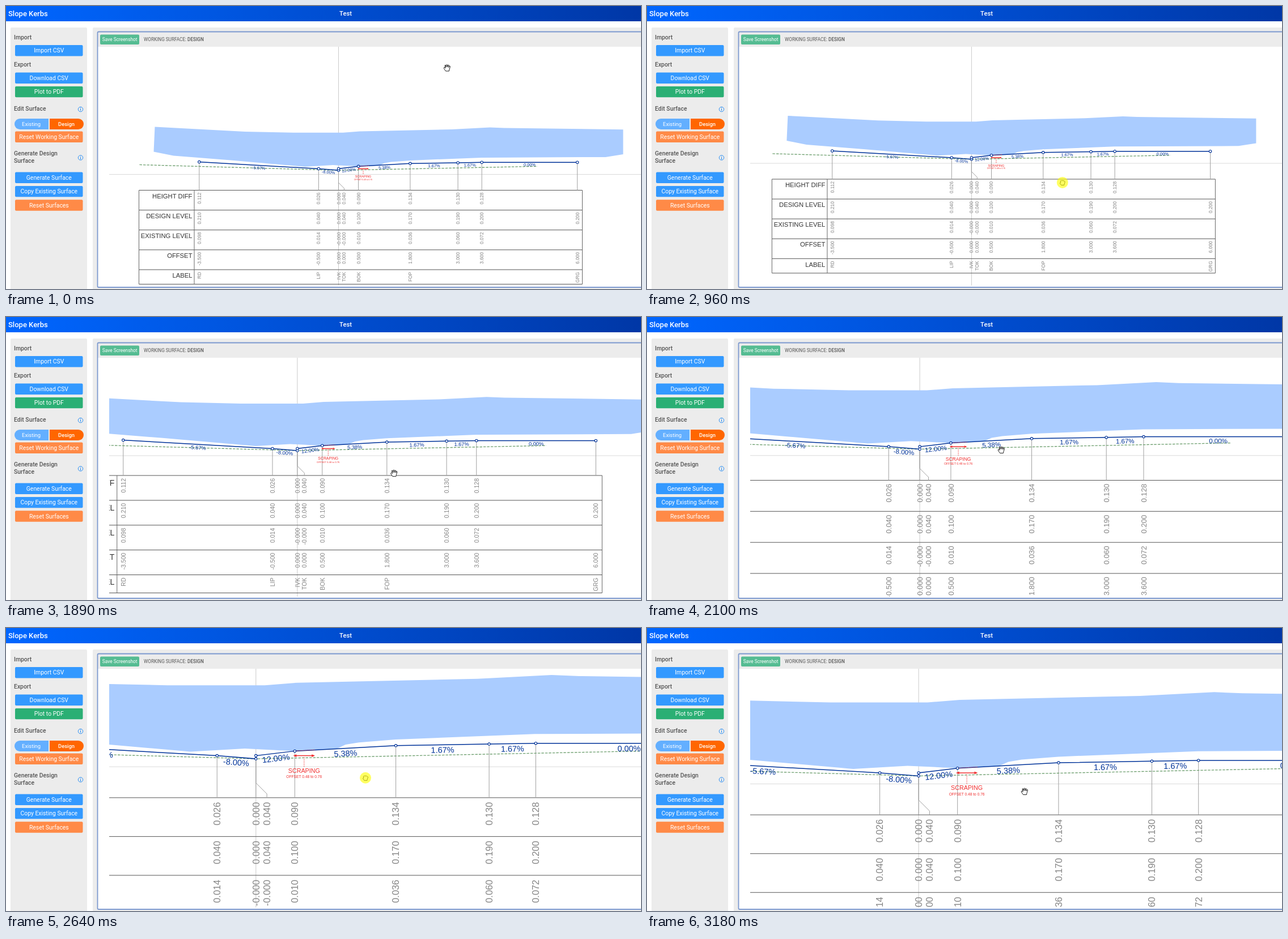
These frames come from a looping animation (1120x500 px, 3.32 s). An HTML page:

```html
<!DOCTYPE html>
<html lang="en">
<head>
<meta charset="utf-8">
<title>Driveway section viewer</title>
<style>
  html, body { margin: 0; width: 100%; height: 100%; overflow: hidden; background: #fff; }
  svg { display: block; }
  .ui { font-family: Roboto, "Open Sans", sans-serif; font-size: 10.4px; }
  .plot { font-family: "Liberation Sans", Arial, sans-serif; }
  .plot line, .plot path, .plot circle { vector-effect: non-scaling-stroke; }
</style>
</head>
<body>
<svg width="100%" height="100%" viewBox="0 0 1120 500">
  <defs>
    <linearGradient id="bar">
      <stop offset="0" stop-color="#0066ff"/>
      <stop offset="1" stop-color="#0037a6"/>
    </linearGradient>
    <clipPath id="view"><rect x="182" y="72" width="938" height="422"/></clipPath>
  </defs>
  <g id="ui" class="ui"></g>
  <g class="plot" clip-path="url(#view)">
    <line id="axisX" x1="182" x2="1120" stroke="#dadada"/>
    <line id="axisY" y1="72" y2="494" stroke="#cbcbcb"/>
    <g id="plot"></g>
  </g>
  <g id="cursor"></g>
</svg>
<script>
const NS = 'http://www.w3.org/2000/svg';
const $ = id => document.getElementById(id);

function add(parent, tag, attrs, text) {
  const el = document.createElementNS(NS, tag);
  for (const name in attrs) el.setAttribute(name, attrs[name]);
  if (text !== undefined) el.textContent = text;
  parent.appendChild(el);
  return el;
}
const rect = (p, x, y, width, height, fill, rx = 0) =>
  add(p, 'rect', { x, y, width, height, fill, rx });
const label = (p, x, y, text, fill, more = {}) => add(p, 'text', { x, y, fill, ...more }, text);
const toPath = pts => 'M' + pts.map(p => p.join(' ')).join('L');
const MIDDLE = { 'text-anchor': 'middle' };

// ---- Page around the drawing ----
const BLUE = '#3399ff', GREEN = '#2baf74', ORANGE = '#ff8a47', GREY = '#ececec';

function heading(y, ...lines) {
  lines.forEach((text, i) => label($('ui'), 14, y + i * 12.7, text, '#555', { 'font-weight': 500 }));
}

function buttons(y, ...items) {
  items.forEach(([text, fill], i) => {
    const top = y + i * 24.4;
    rect($('ui'), 16, top, 119.5, 19.4, fill, 2);
    label($('ui'), 75.8, top + 13.4, text, '#fff', MIDDLE);
  });
}

function info(y) {
  add($('ui'), 'circle', { cx: 131.5, cy: y, r: 4.2, fill: 'none', stroke: '#2b90f5' });
  label($('ui'), 131.5, y + 2.6, 'i', '#2b90f5', { 'font-size': 7.5, 'font-weight': 700, ...MIDDLE });
}

function buildUi() {
  const ui = $('ui');
  rect(ui, 0, 0, 1120, 27, 'url(#bar)');
  label(ui, 4, 17.5, 'Slope Kerbs', '#fff', { 'font-size': 13, 'font-weight': 500 });
  label(ui, 599, 17, 'Test', '#fff', { 'font-size': 11.2, 'font-weight': 500, ...MIDDLE });

  rect(ui, 8, 38, 135, 470, GREY, 2);
  rect(ui, 153, 38, 980, 470, GREY, 2);
  rect(ui, 162, 72, 980, 425, '#fff');
  add(ui, 'rect', { x: 161.5, y: 45.5, width: 980, height: 451.5, rx: 2,
    fill: 'none', stroke: '#7d99cf', 'stroke-width': 1.8 });
  rect(ui, 166, 50.5, 69, 17.5, '#55bc92', 2);
  label(ui, 200.7, 62, 'Save Screenshot', '#fff', { 'font-size': 8.35, ...MIDDLE });
  const caption = label(ui, 243, 62, 'WORKING SURFACE: ', '#555', { 'font-size': 8.2 });
  add(caption, 'tspan', { 'font-weight': 500 }, 'DESIGN');

  heading(58.5, 'Import');
  buttons(69, ['Import CSV', BLUE]);
  heading(107, 'Export');
  buttons(117.5, ['Download CSV', BLUE], ['Plot to PDF', GREEN]);
  heading(185, 'Edit Surface');
  info(182.5);
  add(ui, 'path', { d: 'M75 199H24.5a9.5 9.5 0 0 0 0 19H75z', fill: '#63afff' });
  add(ui, 'path', { d: 'M77 199H127.5a9.5 9.5 0 0 1 0 19H77z', fill: '#ff6600' });
  label(ui, 44.5, 212, 'Existing', '#fff', { 'font-size': 9.4, ...MIDDLE });
  label(ui, 106.5, 212, 'Design', '#fff', { 'font-size': 9.4, 'font-weight': 500, ...MIDDLE });
  buttons(221.5, ['Reset Working Surface', ORANGE]);
  heading(264, 'Generate Design', 'Surface');
  info(268);
  buttons(293.5, ['Generate Surface', BLUE], ['Copy Existing Surface', BLUE], ['Reset Surfaces', ORANGE]);
}

// ---- Section drawing, in units around the datum point ----
const UNIT = 70.2, TABLE = 28, ROW = 35.1, BOTTOM = 194, LEFT = -352, RIGHT = 430;
const NAVY = '#003399', RED = '#f03030';
const point = (offset, level) => [offset * UNIT, -7.2 - level * UNIT];

// The ground falls to the middle; the tiny shift prints its zero as -0.000
const ground = offset => (offset < 0 ? -.028 : .02) * offset - 1e-9;
const GROUND_END = 5;

const STATIONS = [
  { name: 'RD', offset: -3.5, level: .21 },
  { name: 'LIP', offset: -.5, level: .04 },
  { name: 'IVK', offset: 0, level: 0 },
  { name: 'TOK', offset: 0, level: .04, shift: 9.9 },
  { name: 'BOK', offset: .5, level: .1 },
  { name: 'FOP', offset: 1.8, level: .17 },
  { name: '', offset: 3, level: .19 },
  { name: '', offset: 3.6, level: .2 },
  { name: 'GRG', offset: 6, level: .2 }
];

// Outline of the area swept by the vehicle, clockwise from top left
const SWEPT = [[-324, -84], [-165, -75.6], [-80, -73.7], [8, -73.7], [37, -76], [200, -79.6],
  [267, -83], [292, -82], [502, -79.2], [502, -35.5], [471, -30.6], [252, -29.6], [126, -24.6],
  [93, -22], [81, -20], [73, -16.3], [35, -14.2], [-10, -16.4], [-59, -13.6], [-190, -25],
  [-291, -33], [-326, -40]];

function stroke(pts, color, width = 1, dash = 'none') {
  add($('plot'), 'path', { d: toPath(pts), fill: 'none', stroke: color,
    'stroke-width': width, 'stroke-dasharray': dash });
}

function buildTable() {
  const g = $('plot');
  const rows = ['HEIGHT DIFF', 'DESIGN LEVEL', 'EXISTING LEVEL', 'OFFSET', 'LABEL'];
  rows.forEach((text, i) => {
    const y = TABLE + i * ROW;
    stroke([[LEFT, y], [RIGHT, y]], '#555');
    label(g, -258, y + 14.2, text, '#333', { 'font-size': 11.25, 'text-anchor': 'end' });
  });
  stroke([[LEFT, BOTTOM], [RIGHT, BOTTOM]], '#555');
  [LEFT, -254.5, RIGHT].forEach(x => stroke([[x, TABLE], [x, BOTTOM]], '#666'));

  STATIONS.forEach(({ name, offset, level, shift = 0 }) => {
    const [x, y] = point(offset, level);
    stroke(shift ? [[x, y], [x, 14.6], [x + shift, 24.5], [x + shift, TABLE]] : [[x, y], [x, TABLE]],
      '#a0a0a0');
    const known = offset <= GROUND_END, base = ground(offset);
    const cells = [known && level - base, level, known && base, offset, name];
    cells.forEach((cell, i) => add(g, 'text', {
      transform: `translate(${x + shift + 3} ${TABLE + i * ROW + 4}) rotate(-90)`,
      'font-size': 8.4, 'text-anchor': 'end', fill: '#858585'
    }, typeof cell === 'number' ? cell.toFixed(3) : cell || ''));
  });
}

function buildScraping() {
  const g = $('plot'), y = -10;
  const [from] = point(.48, 0), [to] = point(.76, 0), mid = (from + to) / 2;
  stroke([point(.48, .1), point(.76, .115)], RED, 1, '1.5 1.5');
  stroke([[mid, y + 1.5], [mid, 0]], RED, 1, '1.5 1.5');
  stroke([[from + 1, y], [to - 1, y]], RED, 1.5);
  [[from, 3], [to, -3]].forEach(([x, d]) =>
    add(g, 'path', { d: toPath([[x, y], [x + d, y - 1.2], [x + d, y + 1.2]]) + 'Z', fill: RED }));
  label(g, mid, 5.6, 'SCRAPING', RED, { 'font-size': 5.5, ...MIDDLE });
  label(g, mid, 10.4, 'OFFSET 0.48 to 0.76', RED, { 'font-size': 3.4, ...MIDDLE });
}

function buildPlot() {
  const g = $('plot');
  add(g, 'path', { d: toPath(SWEPT) + 'Z', fill: '#aaccff' });
  buildTable();

  stroke([-GROUND_END, 0, GROUND_END].map(o => point(o, ground(o))), '#6fa070', 1.3, '4.5 2');
  const design = STATIONS.map(s => point(s.offset, s.level));
  stroke(design, NAVY, 1.5);
  design.slice(1).forEach(([x2, y2], i) => {
    const [x1, y1] = design[i];
    if (x1 === x2) return;
    const slope = (y1 - y2) / (x2 - x1);
    const turn = -Math.atan(slope) * 180 / Math.PI;
    add(g, 'text', {
      transform: `translate(${(x1 + x2) / 2} ${(y1 + y2) / 2}) rotate(${turn})`,
      y: 7.2, 'font-size': 7.4, fill: NAVY, ...MIDDLE
    }, (slope * 100).toFixed(2) + '%');
  });

  buildScraping();
  return design.map(([cx, cy]) =>
    add(g, 'circle', { cx, cy, fill: '#fff', stroke: NAVY, 'stroke-width': 1.1 }));
}

// ---- Hand cursor; the held glow lies over it ----
const OPEN = 'M-2.5 6L-5.5 1.5Q-6.5 0-5-.6Q-4-.6-3 1L-4-3.5Q-4-5-2.8-4.6L-1.7-1L-1.2-5' +
  'Q-.5-6.3.5-5L.6-1L1.9-4.6Q3-5.4 3.4-4L2.8-.5L4.4-2.8Q5.6-3.2 5.5-1.8L4 3L3.4 6Z';
const SHUT = 'M-2.2 4.6L-4.4 1.4Q-4.6-.2-3 0L-3.6-2.6Q-2.4-4.2-1.2-3Q0-4.4 1.2-3' +
  'Q2.4-3.8 3.2-2.4Q4.6-2.4 4.4-.6L3.2 2.6L3 4.6Z';
const hand = add($('cursor'), 'path',
  { fill: '#fff', stroke: '#222', 'stroke-width': 1, 'stroke-linejoin': 'round' });
const glow = add($('cursor'), 'circle', { r: 10, fill: '#ff0', 'fill-opacity': .62 });

// ---- Motion: the pointer hovers, drags and zooms the drawing ----
const LOOP = 3320, STEP = 67.5, LAG = 25, ZOOM = 1.25;

const EVENTS = [
  { kind: 'hover', from: 0, to: 480, by: [-29, 225] },
  { kind: 'drag', press: 670, from: 768, to: 1288, release: 1620, by: [-36, -38.5], power: [1.44, 2.05] },
  { kind: 'hover', from: 1770, to: 2085, by: [-88, -61] },
  { kind: 'zoom', from: 1820, at: [697, 315] },
  { kind: 'zoom', from: 2090, at: [645, 246] },
  { kind: 'zoom', from: 2158, at: [645, 246] },
  { kind: 'hover', from: 2320, to: 2560, by: [2, 23] },
  { kind: 'drag', press: 2560, from: 2605, to: 3035, release: 3170, by: [39, 31], power: [3, 4] }
];

const clamp = u => Math.min(1, Math.max(0, u));
const smooth = u => u * u * (3 - 2 * u);

function travel({ from, to, by, power }, t) {
  const u = clamp((t - from) / (to - from));
  return by.map((d, i) => d * (power ? 1 - (1 - u) ** power[i] : smooth(u)));
}

function state(t) {
  let pointer = [778, 109], datum = [586.5, 297.5], zoom = 1, held = false;
  const shift = (p, d) => p.map((v, i) => v + d[i]);
  for (const e of EVENTS) {
    if (e.kind === 'zoom') {
      if (t < e.from) continue;
      zoom *= ZOOM;
      datum = datum.map((v, i) => e.at[i] + (v - e.at[i]) * ZOOM);
    } else {
      pointer = shift(pointer, travel(e, t));
      if (e.kind === 'drag') {
        datum = shift(datum, travel(e, t - LAG));
        held = held || (t >= e.press && t < e.release);
      }
    }
  }
  return { pointer, datum, zoom, held };
}

function draw(time) {
  const { pointer, datum, zoom, held } = state(Math.floor(time / STEP) * STEP);
  const [x, y] = datum;
  $('plot').setAttribute('transform', `translate(${x} ${y}) scale(${zoom})`);
  dots.forEach(dot => dot.setAttribute('r', 2.2 / zoom));
  ['1', '2'].forEach(n => {
    $('axisX').setAttribute('y' + n, y);
    $('axisY').setAttribute('x' + n, x);
  });
  $('cursor').setAttribute('transform', `translate(${pointer})`);
  glow.setAttribute('visibility', held ? 'visible' : 'hidden');
  hand.setAttribute('d', held ? SHUT : OPEN);
}

buildUi();
const dots = buildPlot();
const begin = performance.now();
function frame() {
  draw((performance.now() - begin) % LOOP);
  requestAnimationFrame(frame);
}
frame();
</script>
</body>
</html>
```
